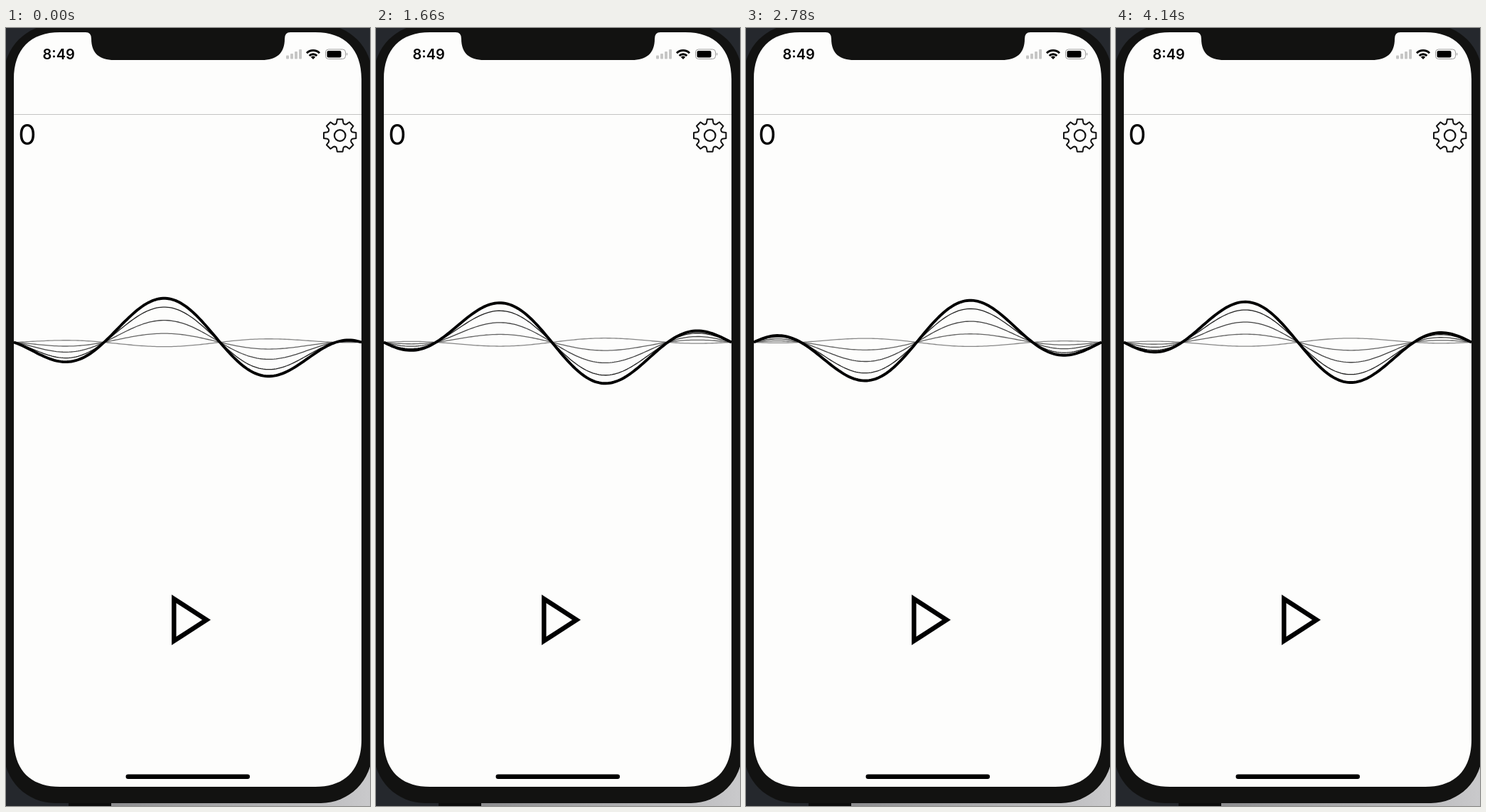
Recreate the animation shown at these times as an HTML page. Size 512x1093 px, loop 4.24 s.

```html
<!DOCTYPE html>
<html lang="en">
<head>
<meta charset="utf-8">
<title>Waveform player</title>
<style>
  html, body { margin: 0; width: 100%; height: 100%; overflow: hidden; background: #25282d; }
  svg { display: block; width: 100%; height: 100%; }
  text { font-family: Inter, "Liberation Sans", sans-serif; }
</style>
</head>
<body>
<svg viewBox="0 0 512 1093" preserveAspectRatio="none">
  <defs>
    <linearGradient id="desk">
      <stop offset="0" stop-color="#8d8d8f"/>
      <stop offset="1" stop-color="#c9c9cb"/>
    </linearGradient>
  </defs>

  <!-- Desktop and phone body -->
  <rect width="512" height="1093" fill="#25282d"/>
  <rect x="88" y="1080" width="60" height="13" fill="#0c0c0c"/>
  <rect x="148" y="1000" width="364" height="93" fill="url(#desk)"/>
  <rect x="-3" y="-5" width="518" height="1094" rx="72" fill="#121211"/>

  <!-- Screen and notch -->
  <path fill="#fdfdfc" d="M76 6H112Q120 6 120 15C120 36 132 45 152 45H360C380 45 392 36 392 15Q392 6 400 6H435C477 6 500 30 500 72V1000C500 1042 477 1066 435 1066H76C34 1066 11 1042 11 1000V72C11 30 34 6 76 6Z"/>
  <rect x="11" y="121" width="489" height="1" fill="#c4c4c3"/>

  <!-- Status bar -->
  <text x="51.5" y="43.5" font-size="20" font-weight="600">8:49</text>
  <g fill="#c6c6c5">
    <rect x="394" y="38.5" width="4" height="5" rx="1"/>
    <rect x="400" y="36" width="4" height="7.5" rx="1"/>
    <rect x="406" y="33" width="4" height="10.5" rx="1"/>
    <rect x="412" y="30" width="4" height="13.5" rx="1"/>
  </g>
  <g fill="none" stroke="#000" stroke-width="3">
    <path d="M423 35.2A12.7 12.7 0 0 1 441 35.2"/>
    <path d="M426.7 39A7.5 7.5 0 0 1 437.3 39"/>
  </g>
  <path d="M428.8 40.8Q432 38.2 435.2 40.8L432 44Z"/>
  <rect x="449.5" y="30" width="28" height="13.5" rx="4" fill="none" stroke="#999"/>
  <rect x="451.5" y="32" width="20" height="9.5" rx="2"/>
  <path d="M479 34.5Q481.5 36.7 479 39Z" fill="#999"/>

  <text x="17.3" y="163.5" font-size="40">0</text>
  <g fill="none" stroke="#111" stroke-width="2" stroke-linejoin="round" transform="translate(469.7 151)">
    <path id="gear"/>
    <circle r="7.8" stroke-width="2.2"/>
  </g>

  <g id="waves" fill="none" stroke="#000"></g>

  <path fill-rule="evenodd" d="M233 796L288 831.5L233 867ZM239.5 808V855L276 831.5Z"/>
  <rect x="168.5" y="1048.5" width="174.5" height="6.5" rx="3.25"/>
</svg>

<script>
const LOOP = 4240;
const LEFT = 11, WIDTH = 489, MID_Y = 441.5, AMP = 63;
const PERIOD = WIDTH / 1.5;
const STEP = 0.15 / (2 * Math.PI) * PERIOD;   // rightward shift per tick
const LEVELS = [-0.1, 0.2, 0.5, 0.8, 1];
// [time in ms, ticks elapsed]
const PACE = [[0, 0], [1060, 24], [1660, 35], [2320, 47], [2780, 55], [3580, 68], [4140, 78]];

const gear = [];
for (let i = 0; i < 8; i++) {
  for (const [r, da] of [[17.2, -0.34], [18, -0.27], [23, -0.17], [23, 0.17], [18, 0.27], [17.2, 0.34]]) {
    const a = i * Math.PI / 4 + da;
    gear.push((r * Math.sin(a)).toFixed(2) + ' ' + (-r * Math.cos(a)).toFixed(2));
  }
}
document.getElementById('gear').setAttribute('d', 'M' + gear.join('L') + 'Z');

const group = document.getElementById('waves');
const waves = LEVELS.map((level, i) => {
  const path = document.createElementNS('http://www.w3.org/2000/svg', 'path');
  path.setAttribute('stroke-width', level === 1 ? 3.9 : 1.3);
  path.setAttribute('stroke-opacity', 1 / 3 + 2 / 3 * (i + 1) / 5);
  group.append(path);
  return path;
});

function ticksAt(t) {
  // Every 560 ms the picture rests for 100 ms
  const rest = (t + 20) % 560;
  if (t >= 540 && rest < 100) t -= rest;
  t = Math.min(t, 4140);
  let i = 1;
  while (t > PACE[i][0]) i++;
  const [t0, n0] = PACE[i - 1], [t1, n1] = PACE[i];
  return Math.floor(n0 + (n1 - n0) * (t - t0) / (t1 - t0) + 1e-6);
}

function wavePath(level, shift) {
  let d = '';
  for (let x = 0; x <= WIDTH; x += 3) {
    const envelope = 1 - (2 * x / WIDTH - 1) ** 2;
    const wave = Math.sin(2 * Math.PI * (x + LEFT - 138 - shift) / PERIOD);
    d += (d ? 'L' : 'M') + (LEFT + x) + ' ' + (MID_Y - AMP * level * envelope * wave).toFixed(2);
  }
  return d;
}

function draw() {
  const t = Math.floor(performance.now() % LOOP / 20) * 20;
  const shift = ticksAt(t) * STEP;
  waves.forEach((path, i) => path.setAttribute('d', wavePath(LEVELS[i], shift)));
  requestAnimationFrame(draw);
}
draw();
</script>
</body>
</html>
```
